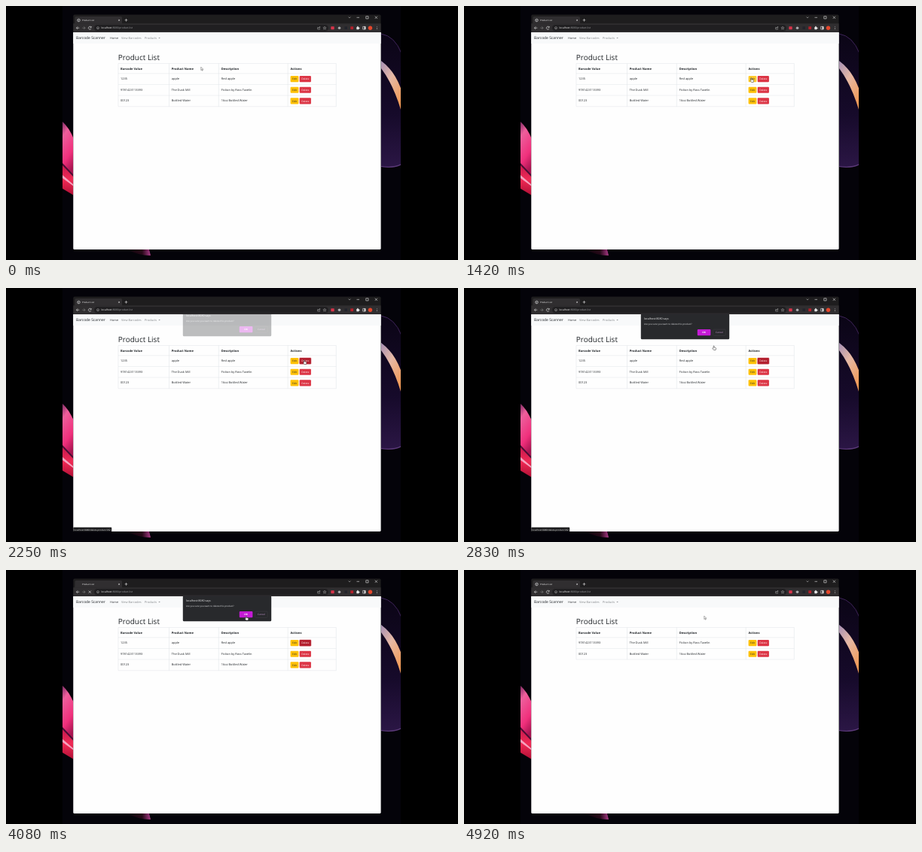
These frames come from a looping animation (600x338 px, 5.01 s). An HTML page:

```html
<!DOCTYPE html>
<html lang="en">
<head>
<meta charset="utf-8">
<title>Product List</title>
<style>
html, body { margin: 0; width: 100%; height: 100%; overflow: hidden; background: #000; }
svg { display: block; width: 100vw; height: 100vh; }
text { font-family: "Open Sans", "Noto Sans", sans-serif; text-rendering: geometricPrecision; white-space: pre; }
</style>
</head>
<body>
<svg id="stage" viewBox="0 0 600 338">
  <defs>
    <linearGradient id="pink" x1="0" y1="0" x2="0.3" y2="1">
      <stop offset="0" stop-color="#7d2a63"/><stop offset=".25" stop-color="#ee5f9c"/>
      <stop offset=".7" stop-color="#f0307c"/><stop offset="1" stop-color="#a81450"/>
    </linearGradient>
    <linearGradient id="red" x1="0" y1="0" x2="0" y2="1">
      <stop offset="0" stop-color="#c2184f"/><stop offset=".5" stop-color="#f02a55"/><stop offset="1" stop-color="#b00f35"/>
    </linearGradient>
    <linearGradient id="foot" x1="0" y1="0" x2="1" y2="0">
      <stop offset="0" stop-color="#0c0208"/><stop offset=".65" stop-color="#260818"/><stop offset="1" stop-color="#a83a86"/>
    </linearGradient>
    <linearGradient id="lobe" x1="0" y1="0" x2="0" y2="1">
      <stop offset="0" stop-color="#0b0516"/><stop offset=".6" stop-color="#160a2a"/><stop offset="1" stop-color="#2b1645"/>
    </linearGradient>
    <linearGradient id="band" x1="0" y1="0" x2="0.6" y2="1">
      <stop offset="0" stop-color="#a58fb4"/><stop offset=".45" stop-color="#e6b9a6"/><stop offset="1" stop-color="#f09a58"/>
    </linearGradient>
    <clipPath id="desk"><rect x="75" width="449" height="338"/></clipPath>
    <clipPath id="view"><path d="M89.3 23H497.6V322.5Q497.6 324.1 496 324.1H91Q89.3 324.1 89.3 322.5Z"/></clipPath>
  </defs>
  <rect width="600" height="338"/>
  <g clip-path="url(#desk)">
    <rect x="75" width="449" height="338" fill="#040309"/>
    <path d="M75 154Q84 162 90 177V229L75 211Z" fill="url(#pink)"/>
    <path d="M75 210L90 226V252L75 243Z" fill="url(#red)"/>
    <path d="M75 209L90 225V228L75 212Z" fill="#4b0d34"/>
    <path d="M75 225L90 238V240L75 229Z" fill="#f7a3bf"/>
    <path d="M160 324H190L192 332Q180 333 160 324Z" fill="url(#foot)"/>
    <path d="M498 37Q516 40 525 63V211Q514 217 498 214Z" fill="url(#lobe)"/>
    <path d="M498 37Q516 40 525 63" fill="none" stroke="#3d2357" stroke-width="1"/>
    <path d="M498 73Q516 86 525 112V141Q514 104 498 83Z" fill="url(#band)"/>
    <path d="M498 213.5Q514 216 525 210.5" fill="none" stroke="#5b3a78" stroke-width="1.2"/>
  </g>
  <g id="win"></g>
  <g id="page" clip-path="url(#view)"></g>
  <g id="dialog"></g>
  <g id="status"></g>
  <path id="arrow" d="M0 0V4.3L1 3.4L1.7 5L2.4 4.7L1.7 3.1H3.1Z" fill="#fff" stroke="#333" stroke-width=".4"/>
  <path id="hand" d="M-.5 3.4V.5Q0-.1.5.5V2.2L2.6 2.8Q3.1 3 3 3.7L2.5 5.7H-.1L-1.7 3.8Q-1.7 3-.9 3.1Z" fill="#fff" stroke="#111" stroke-width=".45"/>
</svg>
<script>
const LOOP = 5010, STEP = 83.5;
const $ = id => document.getElementById(id);

const rect = (x, y, w, h, fill, more = "") =>
  `<rect x="${x}" y="${y}" width="${w}" height="${h}" fill="${fill}" ${more}/>`;
const text = (x, y, size, str, fill = "#212529", more = "") =>
  `<text x="${x}" y="${y}" font-size="${size}" fill="${fill}" ${more}>${str}</text>`;
const line = (d, color = "#e6e6e6", w = .6, more = "") =>
  `<path d="${d}" fill="none" stroke="${color}" stroke-width="${w}" ${more}/>`;
const dot = (x, y, r, fill, more = "") => `<circle cx="${x}" cy="${y}" r="${r}" fill="${fill}" ${more}/>`;
const bold = 'font-weight="700"', mid = 'text-anchor="middle"';

$("win").innerHTML =
  rect(89.3, 11.5, 408.3, 312.6, "#1e1d1e", 'rx="1.8"') +
  `<path d="M90 23.5Q91.5 23.5 91.5 22V15.5Q91.5 14 93 14H152.5Q154 14 154 15.5V22Q154 23.5 155.5 23.5Z" fill="#302e30"/>` +
  rect(89.3, 23.3, 408.3, 12, "#302e30") +
  rect(117, 25, 311, 8.4, "#201f21", 'rx="4.2"') +
  `<g id="globe">${dot(96.5, 19, 1.8, "none", 'stroke="#dcdddf" stroke-width=".6"')}${line("M95 18.4L96.6 19.2L96.2 20.6M96.8 17.4L97.9 18.6", "#dcdddf", .5)}</g>` +
  text(101, 20.1, 2.9, "Product List", "#fff") +
  line("M149.2 18L151 19.8M151 18L149.2 19.8M157.6 18.8H161.4M159.5 16.9V20.7") +
  line("M454.8 14.6L456 15.8L457.2 14.6M465.5 15.3H469M477.8 13.7H481V16.9H477.8ZM489.8 13.7L493 16.9M493 13.7L489.8 16.9") +
  line("M97.3 29.2H93.5M95.2 27.4L93.4 29.2L95.2 31", "#f0f0f0") +
  line("M101.3 29.2H105M103.3 27.4L105.1 29.2L103.3 31", "#8a8a8a") +
  line("M113 28.3A1.9 1.9 0 1 0 113.1 30M113.2 27V28.5H111.7", "#f0f0f0", .6, 'id="reload"') +
  line("M109.7 27.6L112.9 30.8M112.9 27.6L109.7 30.8", "#f0f0f0", .6, 'id="stop"') +
  dot(122, 29.2, 1.5, "none", 'stroke="#bbb" stroke-width=".5"') + line("M122 29V30.1", "#bbb", .5) +
  text(126.5, 30.4, 3.35, 'localhost<tspan fill="#a4a6a9">:8080/product-list</tspan>', "#fff") +
  line("M415 28.5H413.7V31H416.6V29.8M414.8 29.8Q415 28.2 417 28.1M416 27.2L417.1 28.1L416 29", "#bbb", .5) +
  line("M423 27.2L423.6 28.6L425 28.7L424 29.7L424.3 31.1L423 30.3L421.7 31.1L422 29.7L421 28.7L422.4 28.6Z", "#bbb", .45) +
  rect(431.3, 27.2, 4.4, 4, "#d8344a", 'rx=".6"') +
  dot(442.5, 29.2, 1.8, "#a9aaad") +
  rect(449.4, 27.4, 3.6, 3.6, "#22242b") +
  rect(457.3, 27.3, 3.8, 3.8, "#b3202a") +
  rect(465.3, 27.9, 3.3, 3.3, "#e6e6e6", 'rx=".4"') + dot(466.9, 27.6, .8, "#e6e6e6") + dot(468.8, 29.5, .8, "#e6e6e6") +
  line("M473.7 27.4H477V31H473.7Z", "#eee", .6) + rect(475.6, 27.3, 1.6, 3.8, "#eee") +
  dot(483.5, 29.2, 2.7, "#e4472c") +
  [27.6, 29.2, 30.8].map(y => dot(492.3, y, .45, "#ddd")).join("");

const products = [
  ["1235", "apple", "Red apple"],
  ["9781423113393", "The Dusk Mill", "Fiction by Ross Tavelin"],
  ["00123", "Bottled Water", "16oz Bottled Water"]
];
const cols = [152, 219.8, 285.8, 377.5], edges = [149, 216.5, 282.3, 374.2, 438.3];
const top0 = 76.5, head = 13.3, pitch = 14.65;

function row(cells, i, hot) {
  const y = top0 + head + i * pitch;
  return cells.map((s, k) => text(cols[k], y + 8.1, 3.95, s)).join("") +
    rect(377.6, y + 3.2, 10.8, 8.2, hot === "edit" ? "#ffca2c" : "#ffc107", 'rx="1"') +
    text(383, y + 8.5, 3.3, "Edit", "#212529", mid) +
    (hot === "delete" ? rect(389.2, y + 2.8, 16.2, 9, "#e9a3ab", 'rx="1.3"') : "") +
    rect(389.7, y + 3.2, 15.2, 8.2, hot === "delete" ? "#b3202f" : "#dc3545", 'rx="1"') +
    text(397.3, y + 8.5, 3.3, "Delete", "#fff", mid);
}

function pageMarkup(list, hot) {
  const end = top0 + head + list.length * pitch;
  const rules = [top0, ...list.map((_, i) => top0 + head + i * pitch), end];
  return rect(89, 35, 409, 290, "#fefefe") +
    rect(89, 35, 409, 15, "#f8f9fa") +
    text(93, 44.2, 4.93, "Barcode Scanner", "#1d2125") +
    text(138, 44, 3.95, "Home", "#333639") +
    text(153, 44, 3.95, "View Barcodes", "#85888b") +
    text(184, 44, 3.95, "Products", "#85888b") +
    `<path d="M202.4 42.1H204.8L203.6 43.3Z" fill="#85888b"/>` +
    text(148.8, 72.4, 10, "Product List", "#212529", 'font-weight="500"') +
    line(rules.map(y => `M149 ${y}H438.3`).join("") + edges.map(x => `M${x} ${top0}V${end}`).join(""), "#dee2e6", .5) +
    ["Barcode Value", "Product Name", "Description", "Actions"]
      .map((s, k) => text(cols[k], 84.7, 4.05, s, "#212529", bold)).join("") +
    list.map((p, i) => row(p, i, i ? "" : hot)).join("");
}

$("dialog").innerHTML =
  rect(234.8, 34.2, 117.4, 34, "#28292c", 'rx="1.5"') +
  text(239, 42.4, 3.65, "localhost:8080 says", "#f1f1f2") +
  text(239, 49.4, 3.03, "Are you sure you want to delete this product?", "#e2e3e5") +
  rect(309.1, 54.5, 19, 9.4, "none", 'rx="1.4" stroke="#8d5a99" stroke-width=".5" id="ring"') +
  rect(309.8, 55.1, 17.6, 8.2, "#c51bd6", 'rx="1" id="ok"') +
  text(318.6, 60.3, 3.1, "OK", "#fff", mid + " " + bold) +
  rect(330.6, 55.1, 16.6, 8.2, "#28292c", 'rx="1" stroke="#47484c" stroke-width=".4"') +
  text(338.9, 60.3, 3.1, "Cancel", "#c99ad2", mid);

$("status").innerHTML =
  rect(89.3, 318.6, 50.9, 5.6, "#1b1b1d", 'rx=".6"') +
  text(90.6, 322.6, 3, "localhost:8080/delete-product/292", "#ececee");

// time, x, y of the pointer tip
const path = [
  [0, 258.8, 81.2], [580, 288, 82], [1170, 308, 84], [1420, 382, 95.8], [1750, 382, 95.8],
  [1920, 396, 95.8], [2420, 396, 95.8], [2830, 331.6, 76.8], [3080, 331.6, 76.8],
  [3340, 318.8, 61.2], [LOOP, 318.8, 61.2]
];
// time, opacity and vertical shift of the dialog
const sheet = [
  [0, 0, -5], [2170, 0, -5], [2250, .3, -4], [2330, .88, -.8], [2420, 1, 0], [4000, 1, 0],
  [4080, .98, -.6], [4170, .4, -3.5], [4250, 0, -5], [LOOP, 0, -5]
];
const tip = [[0, 0], [1860, 0], [1950, 1], [3330, 1], [3420, .6], [3500, 0], [LOOP, 0]];

function at(keys, t, ease = u => u) {
  const i = Math.max(1, keys.findIndex(k => k[0] >= t));
  const a = keys[i - 1], b = keys[i], u = ease((t - a[0]) / (b[0] - a[0]));
  return a.slice(1).map((v, k) => v + (b[k + 1] - v) * u);
}
const smooth = u => u * u * (3 - 2 * u);
const show = (id, on) => $(id).setAttribute("visibility", on ? "visible" : "hidden");

let last = "";
function draw(ms) {
  const step = Math.floor((ms % LOOP + 9) / STEP) % (LOOP / STEP);
  const t = Math.floor(step * STEP / 10) * 10;
  const done = t > 4210, loading = t > 3990 && !done;
  const hot = t < 1330 || done ? "" : t < 1830 ? "edit" : "delete";

  const key = hot + done;
  if (key !== last) {
    $("page").innerHTML = pageMarkup(done ? products.slice(1) : products, hot);
    last = key;
  }
  const [alpha, dy] = at(sheet, t);
  $("dialog").setAttribute("opacity", alpha);
  $("dialog").setAttribute("transform", `translate(0 ${dy})`);
  const over = alpha === 1 && t > 3250 && !loading;
  $("ok").setAttribute("fill", over ? "#ad25bd" : "#c51bd6");
  show("ring", over);
  $("status").setAttribute("opacity", at(tip, t)[0]);

  show("globe", !loading);
  show("reload", !loading);
  show("stop", loading);

  const [x, y] = at(path, t, smooth), hand = t > 1330 && !done;
  show("hand", hand);
  show("arrow", !hand);
  $(hand ? "hand" : "arrow").setAttribute("transform", `translate(${x} ${y})`);
}

const start = performance.now();
function tick() {
  draw(performance.now() - start);
  requestAnimationFrame(tick);
}
tick();
</script>
</body>
</html>
```
